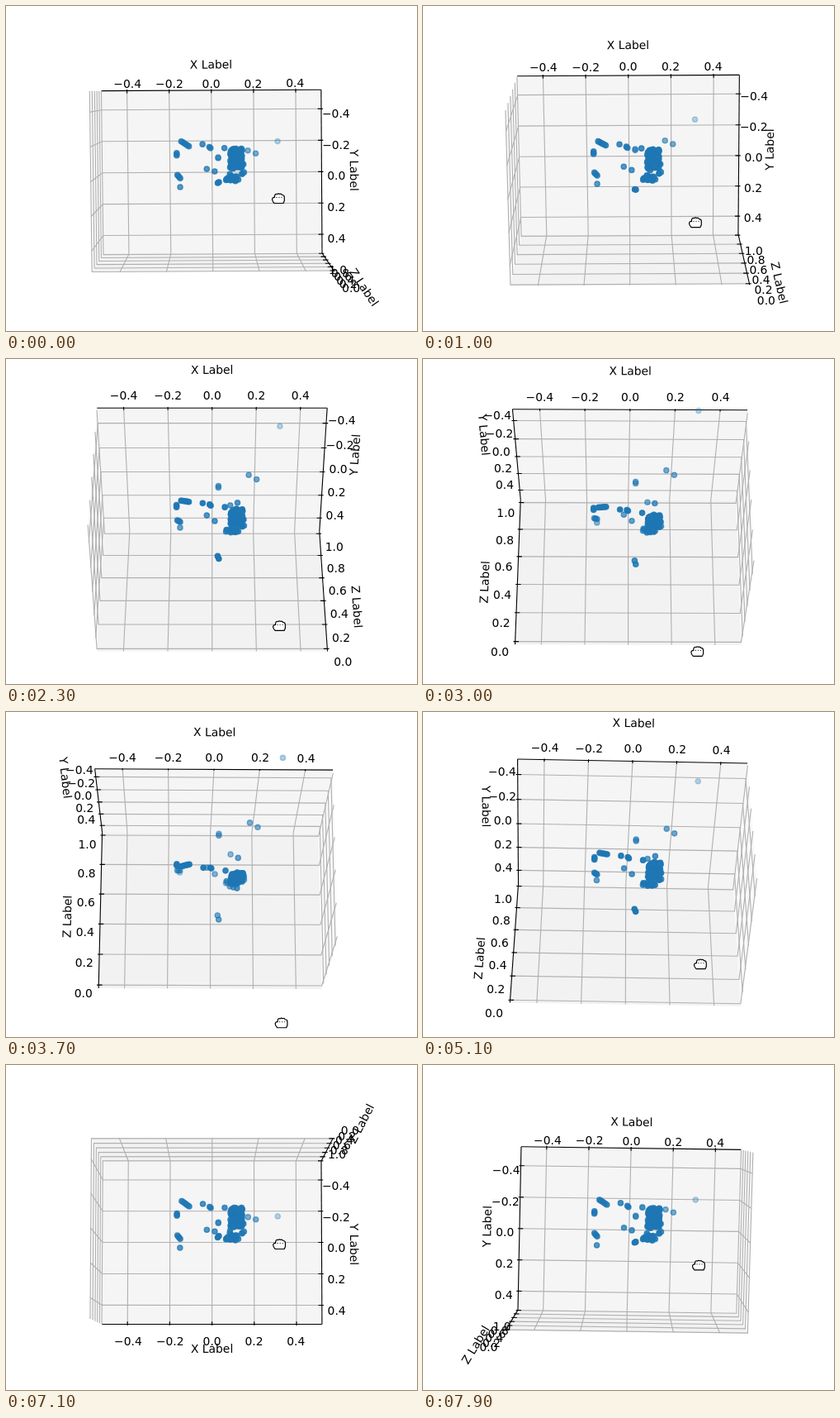
An HTML page with a canvas that plays this animation: 498 by 393 pixels, repeating every 8 s.

```html
<!DOCTYPE html>
<html lang="en">
<head>
<meta charset="utf-8">
<title>Rotating 3D scatter plot</title>
<style>
  html, body { margin: 0; width: 100%; height: 100%; overflow: hidden; background: #fff; }
  canvas { display: block; }
</style>
</head>
<body>
<canvas id="stage" width="498" height="393"></canvas>
<script>
const ctx = document.getElementById('stage').getContext('2d');
const LOOP = 8000;
const STEP = 100;
const RAD = Math.PI / 180;

// Camera and stage mapping
const CENTER = { x: 249.7, y: 206.2 };
const SCALE = { x: 2681, y: 1998 };
const DIST = 10;

// Plot box in centred units, with outward offsets for ticks and labels
const HALF = 0.5 + 1 / 48;
const TICK_PAD = 0.0738;
const LABEL_PAD = 0.1605;
const LINE = 1.11;
const FONT = '13.89px "DejaVu Sans", sans-serif';

const PANES = ['#f9f9f9', '#f2f2f2', '#f5f5f5'];
const steps = (from, count) => Array.from({ length: count }, (_, i) => from + i * 0.2);
const AXES = [
  { name: 'X Label', along: 0, flip: 1, tickDir: 1, ticks: steps(-0.4, 5), shift: 0 },
  { name: 'Y Label', along: 1, flip: 0, tickDir: 0, ticks: steps(-0.4, 5), shift: 0 },
  { name: 'Z Label', along: 2, flip: 0, tickDir: 0, ticks: steps(0, 6), shift: -0.5 }
];

// Motion: a steady drag down, an eased drag back up, a short return
const linear = k => k;
const smooth = k => (1 - Math.cos(Math.PI * k)) / 2;
const ELEVATION = [
  [0, -87], [500, -87], [3000, -30], [3900, -16],
  [6700, -94.8, smooth], [7500, -94.8], [8000, -81.6, smooth]
];
const POINTER_X = [[0, 330], [1700, 330], [5000, 336], [6300, 336], [7300, 330], [7500, 330], [7800, 334]];
const POINTER_LEAD = 120;
const DEG_PER_PX = { x: 0.363, y: 0.487 };

function valueAt(keys, t) {
  const i = keys.findIndex(key => key[0] > t);
  if (i < 0) return keys[keys.length - 1][1];
  const [t0, v0] = keys[i - 1];
  const [t1, v1, ease = linear] = keys[i];
  return v0 + (v1 - v0) * ease((t - t0) / (t1 - t0));
}

// The view refreshes on every step at first, then in a slower uneven beat
function refreshes(step) {
  if (step < 32) return step === 0 || step > 5;
  if (step < 59) return [1, 3, 4, 6, 7, 9].includes(step % 10);
  return step % 3 !== 1;
}
function lastRefresh(t) {
  let step = Math.floor(t / STEP);
  while (!refreshes(step)) step--;
  return step * STEP;
}

let seed = 7;
function random() {
  seed = (seed * 16807) % 2147483647;
  return seed / 2147483647;
}
const mix = (a, b, k) => a.map((v, i) => v + (b[i] - v) * k);

// Evenly spaced points from a to b
function trail(count, a, b) {
  return Array.from({ length: count }, (_, i) => mix(a, b, i / (count - 1)));
}
// Random points in the box between corners a and b
function cloud(count, a, b) {
  return Array.from({ length: count }, () => a.map((v, i) => v + (b[i] - v) * random()));
}

const points = [
  [0.319, -0.188, 0.741], [0.168, -0.144, 0.333], [0.204, -0.127, 0.311],
  [0.083, -0.046, 0.165], [0.115, -0.111, 0.119], [0.057, -0.171, 0.016],
  [-0.024, -0.042, 0.08], [0.012, -0.029, 0.044], [-0.042, -0.195, 0.025],
  [-0.146, 0.068, 0.087],
  ...trail(2, [0.029, -0.105, 0.275], [0.029, -0.1, 0.266]),
  ...trail(3, [-0.16, -0.141, 0.067], [-0.16, -0.126, 0.063]),
  ...trail(2, [-0.011, -0.178, 0.032], [-0.006, -0.171, 0.03]),
  ...trail(6, [-0.138, -0.213, 0.028], [-0.104, -0.182, 0.051]),
  ...trail(4, [-0.158, -0.007, 0.074], [-0.145, 0.014, 0.081]),
  ...trail(2, [0.025, 0.028, -0.2], [0.03, 0.022, -0.228]),
  ...trail(3, [0.08, -0.015, -0.03], [0.11, -0.085, -0.065]),
  ...cloud(130, [0.083, -0.168, -0.015], [0.137, -0.05, 0.008]),
  ...cloud(14, [0.083, -0.005, -0.01], [0.12, 0.03, 0.012]),
  ...cloud(4, [0.063, 0, 0], [0.075, 0.022, 0.02]),
  ...cloud(5, [0.132, -0.15, -0.01], [0.147, 0.005, 0.015])
];

function makeView(elev, azim) {
  const C = Math.cos(elev * RAD), S = -Math.sin(elev * RAD);
  const c = Math.cos(azim * RAD), s = Math.sin(azim * RAD);
  const eye = [C * s, -C * c, -S];
  const right = [c, s, 0];
  const up = [S * s, -S * c, C];
  const dot = (a, b) => a[0] * b[0] + a[1] * b[1] + a[2] * b[2];
  const project = p => {
    const depth = DIST - dot(eye, p);
    return {
      x: CENTER.x + SCALE.x * dot(right, p) / depth,
      y: CENTER.y - SCALE.y * dot(up, p) / depth,
      depth
    };
  };
  // The corner of the box farthest from the eye
  const far = eye.map(v => v < 0 ? HALF : -HALF);
  return { project, far };
}

const withValue = (p, i, v) => p.map((old, n) => n === i ? v : old);
const flipped = (p, i) => withValue(p, i, -p[i]);
const pushOut = (p, along, pad) => p.map((v, n) => n === along ? v : v + Math.sign(v) * pad);

function trace(view, path) {
  ctx.beginPath();
  for (const p of path) {
    const q = view.project(p);
    ctx.lineTo(q.x, q.y);
  }
}

function drawLine(view, path, color) {
  trace(view, path);
  ctx.strokeStyle = color;
  ctx.stroke();
}

function drawPanes(view) {
  PANES.forEach((color, i) => {
    const a = (i + 1) % 3, b = (i + 2) % 3;
    const corner = view.far;
    trace(view, [corner, flipped(corner, a), flipped(flipped(corner, a), b), flipped(corner, b)]);
    ctx.fillStyle = color;
    ctx.fill();
  });
}

function drawAxisName(view, axis, start, end) {
  const p = view.project(start), q = view.project(end);
  const at = view.project(pushOut(withValue(start, axis.along, 0), axis.along, LABEL_PAD));
  let angle = Math.atan2(p.y - q.y, q.x - p.x);
  if (angle > Math.PI / 2) angle -= Math.PI;
  if (angle <= -Math.PI / 2) angle += Math.PI;
  ctx.save();
  ctx.translate(at.x, at.y);
  ctx.rotate(-angle);
  ctx.fillText(axis.name, 0, 3.8);
  ctx.restore();
}

function drawAxis(view, axis) {
  const { along, flip, tickDir } = axis;
  const start = flipped(view.far, flip);
  const end = flipped(start, along);
  const inward = Math.sign(view.far[tickDir]) / 12;

  for (const value of axis.ticks) {
    const base = withValue(view.far, along, value + axis.shift);
    const path = [flipped(base, (along + 1) % 3), base, flipped(base, (along + 2) % 3)];
    drawLine(view, path, '#b0b0b0');
  }
  drawLine(view, [start, end], '#000');
  ctx.fillStyle = '#000';
  drawAxisName(view, axis, start, end);

  for (const value of axis.ticks) {
    const pos = withValue(start, along, value + axis.shift);
    const offset = k => withValue(pos, tickDir, pos[tickDir] + k * inward);
    drawLine(view, [offset(0.2), offset(-0.1)], '#000');
    const at = view.project(pushOut(pos, along, TICK_PAD));
    const sign = value < -0.05 ? '\u2212' : '';
    ctx.fillText(sign + Math.abs(value).toFixed(1), at.x, at.y + 10.8);
  }
}

// Nearer points are more opaque
function drawPoints(view) {
  const dots = points.map(view.project).sort((a, b) => b.depth - a.depth);
  const shade = d => -1 / d.depth;
  const far = shade(dots[0]), near = shade(dots[dots.length - 1]);
  ctx.fillStyle = ctx.strokeStyle = '#1f77b4';
  ctx.lineWidth = 1.39;
  for (const dot of dots) {
    ctx.globalAlpha = 1 - 0.7 * (shade(dot) - near) / (far - near);
    ctx.beginPath();
    ctx.arc(dot.x, dot.y, 3.1, 0, 2 * Math.PI);
    ctx.fill();
    ctx.stroke();
  }
  ctx.globalAlpha = 1;
}

const hand = new Path2D('M-5 6Q-7.5 3.5-7.5 1Q-7-1.5-4.5-1V-3Q-3.5-6-1.5-4.8' +
  'Q0-6.3 1.5-5Q3.5-6 4.5-4Q7.3-4 7.3-1V3L6 6Z');
function drawHand(x, y) {
  ctx.save();
  ctx.translate(x, y);
  ctx.lineWidth = 1.2;
  ctx.lineJoin = 'round';
  ctx.fillStyle = '#fff';
  ctx.strokeStyle = '#000';
  ctx.fill(hand);
  ctx.stroke(hand);
  ctx.fillStyle = '#000';
  for (const dx of [-2, 1, 4]) ctx.fillRect(dx - 0.5, -1.5, 1, 1);
  ctx.restore();
}

function draw(now) {
  const t = lastRefresh(now % LOOP);
  const x = valueAt(POINTER_X, t);
  const lead = valueAt(ELEVATION, t + POINTER_LEAD);
  const y = 232 + (lead - ELEVATION[0][1]) / DEG_PER_PX.y;
  const view = makeView(valueAt(ELEVATION, t), 0.4 - DEG_PER_PX.x * (x - 330));

  ctx.fillStyle = '#fff';
  ctx.fillRect(0, 0, 498, 393);
  ctx.font = FONT;
  ctx.textAlign = 'center';
  ctx.lineWidth = LINE;
  drawPanes(view);
  for (const axis of AXES) drawAxis(view, axis);
  drawPoints(view);
  drawHand(x, y + 0.5);
}

const origin = performance.now();
function tick() {
  draw(performance.now() - origin);
  requestAnimationFrame(tick);
}
tick();
</script>
</body>
</html>
```
